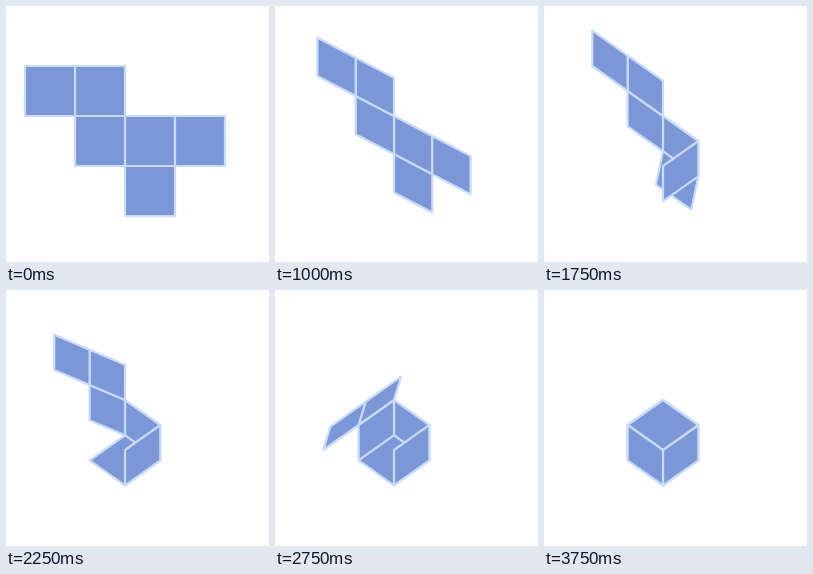
An HTML page with a canvas that plays this animation: 263x256 px, repeating every 4.75 s.

```html
<!DOCTYPE html>
<html lang="en">
<head>
<meta charset="utf-8">
<title>Folding cube net</title>
<style>
  html, body { margin: 0; width: 100%; height: 100%; overflow: hidden; background: #fefefe; }
  canvas { display: block; }
</style>
</head>
<body>
<canvas width="263" height="256"></canvas>
<script>
const ctx = document.querySelector('canvas').getContext('2d');
const SIDE = 50, S = SIDE * Math.SQRT1_2, H = SIDE / 2;
const FIRST_HOLD = 750, HOLD = 250, LOOP = 4750;
// Whole part: which fold is under way; fraction: how far it has got.
const POSES = [0, .4, .8, 1.3, 1.8, 2.2, 2.7, 3.2, 3.7, 4.2, 4.7, 5.2, 5.7, 6];

const add = (a, b) => [a[0] + b[0], a[1] + b[1]];
const neg = a => [-a[0], -a[1]];
const mix = (a, b, p) => a.map((v, i) => v + (b[i] - v) * p);

function face(corner, u, v) {
  ctx.beginPath();
  for (const p of [corner, add(corner, u), add(add(corner, u), v), add(corner, v)]) ctx.lineTo(...p);
  ctx.closePath();
  ctx.fill();
  ctx.stroke();
}

function draw(progress) {
  const fold = step => Math.min(1, Math.max(0, progress - step));
  const origin = [119, 110];
  const right = mix([SIDE, 0], [S, H], fold(0));
  const down = mix([0, SIDE], [0, S], fold(0));
  const front = [-S, H];

  const side = mix(right, front, fold(1));
  const base = mix(down, front, fold(2));
  const wing = mix(neg(right), front, fold(3));
  const lid = mix(neg(down), right, fold(4));
  const flap = mix(wing, down, fold(5));

  ctx.fillStyle = '#fefefe';
  ctx.fillRect(0, 0, 263, 256);
  ctx.fillStyle = '#7b97d8';
  ctx.strokeStyle = '#c8dbf9';
  ctx.lineWidth = 2.2;
  ctx.lineJoin = 'round';

  face(origin, right, down);
  face(origin, wing, down);
  face(add(origin, down), right, base);
  face(add(origin, right), side, down);
  face(origin, wing, lid);
  face(add(origin, wing), flap, lid);
}

function tick() {
  const t = performance.now() % LOOP;
  const pose = t < FIRST_HOLD ? 0 : 1 + Math.floor((t - FIRST_HOLD) / HOLD);
  draw(POSES[Math.min(pose, POSES.length - 1)]);
  requestAnimationFrame(tick);
}
tick();
</script>
</body>
</html>
```
